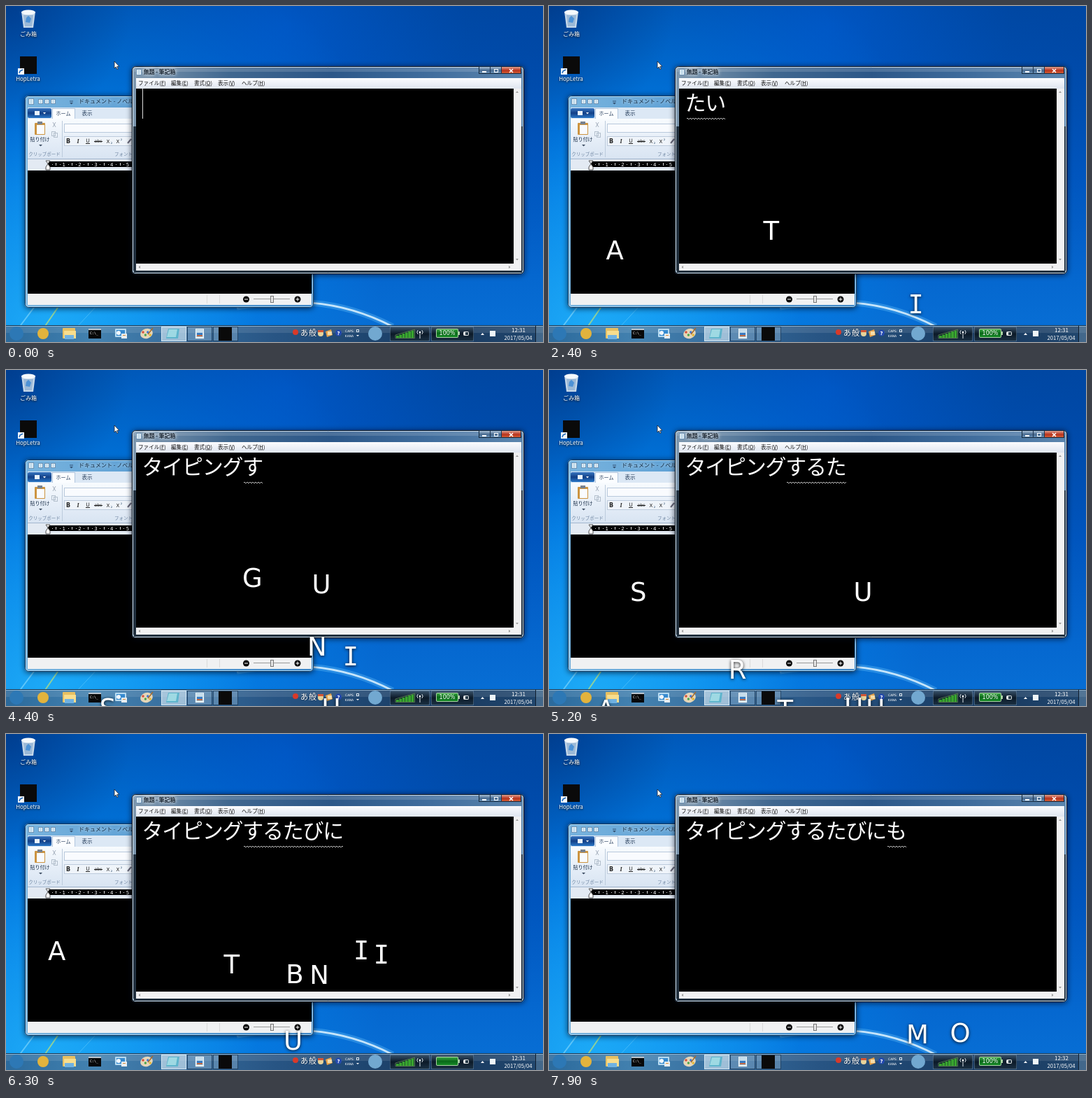
An HTML page with a canvas for the animation above (8000 ms loop, 768x480 px).

```html
<!DOCTYPE html>
<html lang="ja">
<head>
<meta charset="utf-8">
<style>
html, body { margin: 0; width: 100%; height: 100%; overflow: hidden; background: #0058c0; }
canvas { display: block; }
</style>
</head>
<body>
<canvas id="stage" width="768" height="480"></canvas>
<script>
const W = 768, H = 480, LOOP = 8000, STEP = 100;
const JP = '"Noto Sans CJK JP", "Noto Sans CJK", sans-serif';
const LATIN = '"DejaVu Sans", sans-serif';
const MONO = '"DejaVu Sans Mono", monospace';
const view = document.getElementById('stage').getContext('2d');
const desk = document.createElement('canvas');
desk.width = W; desk.height = H;
let c = desk.getContext('2d');

function rect(x, y, w, h, fill) { c.fillStyle = fill; c.fillRect(x, y, w, h); }
function frame(x, y, w, h, color) {
  c.strokeStyle = color; c.lineWidth = 1;
  c.strokeRect(x + .5, y + .5, w - 1, h - 1);
}
function round(x, y, w, h, r, fill) {
  c.fillStyle = fill; c.beginPath(); c.roundRect(x, y, w, h, r); c.fill();
}
function edge(x, y, w, h, r, color) {
  c.strokeStyle = color; c.lineWidth = 1;
  c.beginPath(); c.roundRect(x + .5, y + .5, w - 1, h - 1, r); c.stroke();
}
function disc(x, y, r, fill) {
  c.fillStyle = fill; c.beginPath(); c.arc(x, y, r, 0, 7); c.fill();
}
function line(color, width, ...p) {
  c.strokeStyle = color; c.lineWidth = width; c.beginPath(); c.moveTo(p[0], p[1]);
  for (let i = 2; i < p.length; i += 2) c.lineTo(p[i], p[i + 1]);
  c.stroke();
}
function poly(fill, ...p) {
  c.fillStyle = fill; c.beginPath();
  for (let i = 0; i < p.length; i += 2) c.lineTo(p[i], p[i + 1]);
  c.fill();
}
function fade(x0, y0, x1, y1, ...colors) {
  const g = c.createLinearGradient(x0, y0, x1, y1);
  colors.forEach((v, i) => g.addColorStop(i / (colors.length - 1), v));
  return g;
}
function glow(x, y, r, rgb, alpha) {
  const g = c.createRadialGradient(x, y, 0, x, y, r);
  g.addColorStop(0, `rgba(${rgb},${alpha})`); g.addColorStop(1, `rgba(${rgb},0)`);
  rect(0, 0, W, H, g);
}
// y is the vertical middle of the text
function text(s, x, y, size, color, align = 'left', font = JP, style = '') {
  c.font = `${style} ${size}px ${font}`;
  c.textAlign = align; c.textBaseline = 'alphabetic';
  c.fillStyle = color; c.fillText(s, x, y + size * .37);
}
function shadow(color, blur, dy = 0) { c.shadowColor = color; c.shadowBlur = blur; c.shadowOffsetY = dy; }
function noShadow() { shadow('transparent', 0); }

function wallpaper() {
  rect(0, 0, W, H, fade(0, 0, 0, H, '#004aa6', '#0059c4', '#0870d6'));
  glow(150, 300, 400, '0,150,255', .75);
  glow(60, 470, 300, '40,190,255', .7);
  glow(400, 30, 260, '0,95,220', .5);
  glow(770, 60, 330, '0,60,150', .3);
  glow(0, 0, 180, '0,40,110', .5);
  const curve = (color, w) => {
    c.strokeStyle = color; c.lineWidth = w; c.beginPath();
    c.moveTo(330, 430); c.bezierCurveTo(400, 420, 470, 415, 553, 458); c.stroke();
  };
  curve('rgba(120,205,255,.3)', 9);
  curve('rgba(225,245,255,.85)', 3);
  line('rgba(150,225,255,.55)', 2, 18, 460, 42, 428);
  line('rgba(190,225,120,.7)', 2, 54, 460, 76, 428);
  line('rgba(150,225,255,.35)', 1, 100, 460, 130, 428);
}

function glass(x, y, w, h, fill, rim, shine) {
  shadow('rgba(0,8,25,.75)', 8, 1);
  round(x, y, w, h, 5, fill);
  noShadow();
  edge(x, y, w, h, 5, rim);
  edge(x + 1, y + 1, w - 2, h - 2, 4, shine);
}

function page(x, y, w, h) {
  rect(x, y, w, h, '#eef6fc');
  frame(x, y, w, h, '#6d93b5');
  for (let i = 2; i < h - 2; i += 2) rect(x + 2, y + i, w - 4, 1, '#9dc4dc');
}

function icons() {
  poly('rgba(220,232,242,.9)', 22, 8, 42, 8, 39, 31, 25, 31);
  poly('rgba(120,160,200,.55)', 25, 13, 39, 13, 37, 29, 27, 29);
  c.fillStyle = '#f5f9fc'; c.beginPath(); c.ellipse(32, 9, 10, 3.5, 0, 0, 7); c.fill();
  poly('#4d92d6', 29, 17, 32, 14, 36, 18, 34, 24, 28, 23);
  rect(20, 72, 24, 25, '#0a0a0a');
  rect(17, 89, 9, 9, '#f4f8fc');
  line('#1c66b8', 1.5, 19, 96, 20, 93, 24, 91);
  shadow('#000', 3, 1);
  text('ごみ箱', 32, 40, 8, '#fff', 'center');
  text('HopLetra', 31.5, 104, 8, '#fff', 'center');
  noShadow();
}

function editor() {
  glass(27, 128, 413, 303, fade(27, 0, 440, 0, '#79b4de', '#579bd2', '#3d86c6'), '#123a60', 'rgba(190,230,255,.8)');
  page(32, 132, 8, 9);
  for (let i = 0; i < 3; i++) page(46 + i * 9, 133, 7, 7);
  line('#324f70', 1, 91, 136, 96, 136);
  poly('#324f70', 91, 138, 96, 138, 93.5, 140.5);
  shadow('#fff', 4);
  text('ドキュメント - ノベルド', 104, 136.5, 8, '#12283e');
  noShadow();
  rect(31, 145, 406, 16, '#dce8f5');
  round(31, 146, 34, 14, 2, fade(0, 146, 0, 160, '#3977c2', '#123f86', '#2b78c8'));
  rect(41, 150, 7, 6, '#e9f3fc'); poly('#fff', 53, 152, 57, 152, 55, 154.5);
  rect(66, 146, 33, 16, '#fbfdff'); frame(66, 146, 33, 16, '#b2c6de');
  text('ホーム', 82, 153.5, 7, '#233a58', 'center');
  text('表示', 116, 153.5, 7.5, '#233a58', 'center');
  rect(31, 161, 406, 58, fade(0, 161, 0, 219, '#f8fbfe', '#e6eef8', '#d8e4f2'));
  rect(31, 218, 406, 1, '#a3b7cf');
  rect(80, 164, 1, 52, '#bccbdc');
  round(41, 167, 15, 17, 1, '#cc9440'); rect(44, 170, 11, 13, '#f9fbff');
  rect(45, 165, 7, 4, '#77828f');
  text('貼り付け', 48.5, 190, 7, '#172c46', 'center');
  poly('#3c4d62', 47, 198, 52, 198, 49.5, 200.5);
  line('#a8b3c0', 1, 67, 166, 71, 173); line('#a8b3c0', 1, 71, 166, 67, 173);
  frame(65, 179, 6, 7, '#b3bfcc'); frame(68, 181, 6, 7, '#b3bfcc');
  rect(83, 168, 100, 13, '#f9fbfe'); frame(83, 168, 100, 13, '#b9c9dc');
  rect(83, 186, 100, 14, '#eff4fa'); frame(83, 186, 100, 14, '#bdcbdc');
  text('B', 89, 193, 8, '#222', 'center', LATIN, 'bold');
  text('I', 103, 193, 8, '#222', 'center', '"Liberation Serif", serif', 'italic bold');
  text('U', 117, 192, 7.5, '#222', 'center', LATIN); rect(114, 196, 6, 1, '#222');
  text('abc', 132, 193, 6, '#222', 'center', LATIN); rect(126, 193, 12, 1, '#222');
  text('X', 146, 193, 7, '#222', 'center', LATIN); text('₂', 151, 195, 6, '#246', 'center', LATIN);
  text('X', 160, 193, 7, '#222', 'center', LATIN); text('²', 165, 192, 6, '#246', 'center', LATIN);
  line('#667', 2, 174, 196, 179, 190);
  text('クリップボード', 55, 212, 6.5, '#7389a4', 'center');
  text('フォント', 168, 212, 6.5, '#7389a4', 'center');
  rect(31, 219, 406, 16, '#e3eaf3');
  rect(60, 222, 377, 8, '#000');
  for (let i = 0; i < 6; i++) {
    const x = 60 + i * 22.8;
    if (i) text(i, x, 226, 7, '#fff', 'center', LATIN);
    for (let j = 1; j < 4; j++) rect(Math.round(x + j * 5.7), j === 2 ? 224 : 226, 1, j === 2 ? 4 : 1, '#ddd');
  }
  poly('#f8f8f8', 57, 221, 63, 221, 60, 225);
  poly('#f8f8f8', 57, 234, 57, 230, 60, 226, 63, 230, 63, 234);
  line('#555', 1, 57, 221, 63, 221, 57, 230, 57, 234, 63, 234, 63, 230, 57, 221);
  rect(31, 235, 406, 177, '#000');
  rect(31, 411, 406, 16, '#f0f1f2');
  rect(287, 413, 1, 12, '#dadada'); rect(305, 413, 1, 12, '#dadada');
  disc(343.5, 419, 4.5, '#0a0a0a'); rect(341, 418.5, 5, 1, '#fff');
  disc(417, 419, 4.5, '#0a0a0a'); rect(414.5, 418.5, 5, 1, '#fff'); rect(416.5, 416.5, 1, 5, '#fff');
  rect(354, 418, 52, 1, '#9a9a9a');
  round(378, 414, 5, 10, 1.5, '#e5e5e5'); frame(378, 414, 5, 10, '#777');
}

function notepad() {
  glass(180, 86, 561, 297, fade(181, 0, 741, 0, '#7f99b0', '#40678f', '#2c5788', '#3f6c9c', '#5c86ae'), '#0a141f', 'rgba(225,238,248,.85)');
  rect(183, 88, 555, 6, 'rgba(255,255,255,.15)');
  rect(182, 172, 4, 206, '#22313f'); rect(737, 172, 2, 206, '#22313f');
  rect(183, 378, 555, 3, '#22313f');
  page(186, 90, 8, 9);
  shadow('#fff', 5);
  for (let i = 0; i < 2; i++) text('無題 - 筆記箱', 197, 94.5, 7.8, '#0b1826');
  noShadow();
  rect(676, 87, 32, 10, fade(0, 87, 0, 97, '#a9c0d6', '#46698f', '#6f99bf'));
  rect(708, 87, 29, 10, fade(0, 87, 0, 97, '#e0a08f', '#b8321c', '#d9673a'));
  frame(676, 86, 61, 11, '#15293d'); rect(692, 87, 1, 10, '#1d3450'); rect(708, 87, 1, 10, '#1d3450');
  rect(681, 93, 6, 2, '#fff'); frame(698, 90, 6, 5, '#fff');
  line('#fff', 1.5, 720, 90, 725, 95); line('#fff', 1.5, 725, 90, 720, 95);
  rect(186, 103, 551, 15, fade(0, 103, 0, 118, '#fbfcfe', '#dfe5f0'));
  const menu = [['ファイル', 'F', 189], ['編集', 'E', 236], ['書式', 'O', 269], ['表示', 'V', 303], ['ヘルプ', 'H', 337]];
  for (const [name, key, x] of menu) {
    text(`${name}(${key})`, x, 110, 7.6, '#101010');
    const a = c.measureText(name + '(').width, b = c.measureText(key).width;
    rect(x + a, 113.5, b, .8, '#222');
  }
  rect(186, 118, 540, 250, '#000');
  rect(726, 118, 11, 260, '#f1f1f2');
  rect(186, 368, 551, 10, '#f1f1f2');
  poly('#999', 729, 124, 733, 124, 731, 121.5);
  poly('#999', 729, 361, 733, 361, 731, 363.5);
  poly('#999', 192, 371, 192, 375, 189.5, 373);
  poly('#999', 719, 371, 719, 375, 721.5, 373);
}

function panel(x, w) {
  round(x, 458, w, 21, 4, fade(0, 458, 0, 479, '#39536c', '#0c1a28', '#1c3245'));
  frame(x, 458, w, 21, 'rgba(140,175,205,.35)');
}

function taskbar() {
  rect(0, 457, W, 23, fade(0, 0, W, 0, '#2b6a9c', '#4482b0', '#356a9a', '#285584', '#1f4670', '#193a60', '#22486f'));
  rect(0, 457, W, 10, 'rgba(255,255,255,.1)');
  rect(0, 456, W, 1, '#153450'); rect(0, 457, W, 1, 'rgba(190,225,250,.6)');
  disc(15, 468, 10, '#2d78b5');
  disc(53, 468, 8, '#e2b33d');
  round(81, 460, 18, 15, 1, '#e6bf62'); rect(83, 464, 17, 11, '#f8dd8d'); rect(84, 470, 13, 6, '#70b2e2');
  rect(118, 461, 18, 14, '#080808'); rect(118, 461, 18, 2, '#b8c2cb');
  text('C:\\_', 120, 467, 5, '#fff', 'left', MONO);
  round(156, 461, 16, 12, 1, '#b5daf1'); rect(158, 463, 12, 8, '#378bd0');
  disc(161, 467, 3, '#f1f7fc'); rect(165, 468, 8, 7, '#e8edf0'); rect(167, 470, 4, 1, '#d88c36');
  c.fillStyle = '#e5d6b8'; c.beginPath(); c.ellipse(201, 468, 9, 7, -.3, 0, 7); c.fill();
  ['#d84d37', '#49a54b', '#3c74d2', '#e6b52f'].forEach((v, i) => disc(196 + i * 3.4, 466 + (i % 2) * 4, 1.7, v));
  line('#a56a2c', 1.5, 203, 469, 210, 460);
  for (let i = 0; i < 3; i++) {
    round(222 + i * 37, 458, 36, 21, 2, i ? 'rgba(165,200,225,.35)' : 'rgba(215,235,248,.65)');
    frame(222 + i * 37, 458, 36, 21, i ? 'rgba(25,55,85,.8)' : '#d4e6f2');
  }
  poly('#5eb4cc', 229, 475, 232, 461, 248, 461, 246, 475);
  poly('#9ed9e3', 230, 473, 233, 462, 245, 462, 243, 473);
  page(270, 460, 14, 16); rect(273, 467, 8, 5, '#3c7cc2'); rect(273, 470, 8, 2, '#c46a42');
  rect(304, 459, 19, 19, '#0a0a0a');

  disc(414, 466, 4, '#d83a2a');
  shadow('#0a1828', 2);
  text('あ', 426.5, 467, 11, '#fff', 'center');
  text('般', 438.5, 467, 11, '#fff', 'center');
  noShadow();
  disc(450, 468, 4, '#e7d39a'); rect(446, 463, 8, 3, '#d25636');
  poly('#e6a34b', 457, 465, 465, 462, 467, 470, 459, 473); rect(460, 465, 6, 5, '#f5dda8');
  disc(475.5, 467, 4.5, '#244aae'); text('?', 475.5, 467, 7, '#fff', 'center', LATIN, 'bold');
  text('CAPS', 491, 464, 4.5, '#fff', 'center', LATIN);
  text('KANA', 491, 471, 4.5, '#fff', 'center', LATIN);
  frame(501, 462, 4, 4, '#dde8f0'); poly('#fff', 501, 470, 505, 470, 503, 472);
  disc(528, 468, 10, '#72a8d0');
  panel(549, 57);
  for (let i = 0; i < 6; i++) rect(558 + i * 4.3, 471 - i * 1.5, 3.8, 3 + i * 1.5, '#39a52e');
  line('#53764f', 1, 557, 474.5, 584.5, 474.5, 584.5, 462, 557, 470, 557, 474.5);
  line('#dce5ea', 1, 592, 466, 592, 475);
  disc(592, 466, 1.3, '#fff');
  c.strokeStyle = '#dce5ea';
  for (const a of [0, Math.PI]) { c.beginPath(); c.arc(592, 466, 4, a - .8, a + .8); c.stroke(); }
  panel(608, 61);
  round(615, 461, 32, 13, 2, '#acd2a7'); round(616, 462, 30, 11, 1, fade(0, 462, 0, 473, '#3aa642', '#096819', '#178a27'));
  rect(647, 465, 2, 5, '#acd2a7');
  round(654, 465, 8, 6, 2, '#e2e6e7'); rect(657, 466, 4, 4, '#273b49');
  poly('#fff', 679, 470, 684, 470, 681.5, 467);
  rect(692, 464, 8, 8, '#eef5f8');
  rect(757, 457, 11, 23, 'rgba(150,185,210,.28)'); rect(757, 457, 1, 23, '#101e2e');
}

function pointer() {
  c.save(); c.translate(155, 79);
  c.beginPath();
  for (const [x, y] of [[0, 0], [0, 10], [2.3, 8], [3.8, 11.5], [5.3, 10.8], [3.8, 7.5], [6.7, 7.2]]) c.lineTo(x, y);
  c.closePath(); c.fillStyle = '#fff'; c.fill();
  c.lineWidth = .7; c.strokeStyle = '#111'; c.stroke();
  c.restore();
}

// letter, time at peak, x and y at peak, sideways speed, fall rate
const hops = [
  ['T', 2380, 318, 320, -10], ['A', 2340, 94, 347, 4], ['I', 2922, 507, 344, -34],
  ['P', 3640, 679, 394, -10], ['I', 3852, 511, 318, -33], ['N', 3973, 453, 340, -19],
  ['G', 4375, 352, 296, 15, 310], ['U', 4400, 451, 305, -19, 275],
  ['S', 5146, 129, 315, -22], ['U', 5146, 450, 315, -20],
  ['R', 5556, 266, 389, -10], ['U', 5821, 435, 368, -51],
  ['T', 5986, 327, 299, -13.6], ['A', 6015, 75, 285, -8],
  ['B', 6250, 413, 342, 0], ['I', 6310, 508, 308, -20],
  ['N', 6450, 445, 337, -20], ['I', 6510, 539, 301, 10],
  ['M', 8530, 520, 309, -11], ['O', 8530, 585, 307, -5]
];

// start, settled text, text being composed, converted or not
const typing = [
  [0, '', ''], [1640, '', 'た'], [2210, '', 'たい'], [3080, '', 'たいぴ'], [3250, '', 'たいぴｎ'],
  [3560, '', 'タイピング', true], [4100, 'タイピング', ''], [4370, 'タイピング', 'す'],
  [4950, 'タイピング', 'する'], [5180, 'タイピング', 'するた'], [5510, 'タイピング', 'するたび'],
  [5700, 'タイピング', 'するたびに'], [7000, 'タイピングするたびに', ''], [7720, 'タイピングするたびに', 'も']
];

function typed(t) {
  const [start, done, open, solid] = typing.findLast(s => s[0] <= t);
  const em = 28.75, x0 = 195.5, x1 = x0 + done.length * em, x2 = x1 + open.length * em;
  [...(done + open)].forEach((ch, i) => text(ch, x0 + (i + .5) * em - .5, 137.5, 30, '#fff', 'center'));
  if (solid) rect(x0, 160, x2 - x0, 1, '#fff');
  else if (open) {
    const from = Math.round(x1) + 1;
    for (let x = from; x < x2 - 1; x++) rect(x, 160 + (x - from >> 1 & 1), 1, 1, '#bbb');
  }
  if (solid || (!open && (t - start) % 1060 < 530)) rect(Math.round(x2) - 1, 118, 1, 43, '#ddd');
}

function letters(t) {
  shadow('rgba(0,0,0,.85)', 4, 1);
  for (const [ch, peak, x, y, vx, fall = 300] of hops) {
    const s = (t - peak) / 1000, py = y + fall * s * s;
    if (py < 510) text(ch, x + vx * s, py, 37, '#fff', 'center', ch === 'I' ? MONO : LATIN);
  }
  noShadow();
}

wallpaper(); icons(); editor(); notepad(); taskbar(); pointer();
c = view;

function draw(now) {
  const t = Math.floor(now % LOOP / STEP) * STEP;
  c.drawImage(desk, 0, 0);
  typed(t);
  if (t < 5900 || t >= 6900) text('100%', 631, 467.5, 8, '#fff', 'center', LATIN);
  text(t < 7000 ? '12:31' : '12:32', 733, 463, 8, '#fff', 'center');
  text('2017/05/04', 732.5, 474, 7.7, '#fff', 'center');
  letters(t);
}

const begin = performance.now();
function tick() {
  draw(performance.now() - begin);
  requestAnimationFrame(tick);
}
tick();
</script>
</body>
</html>
```
